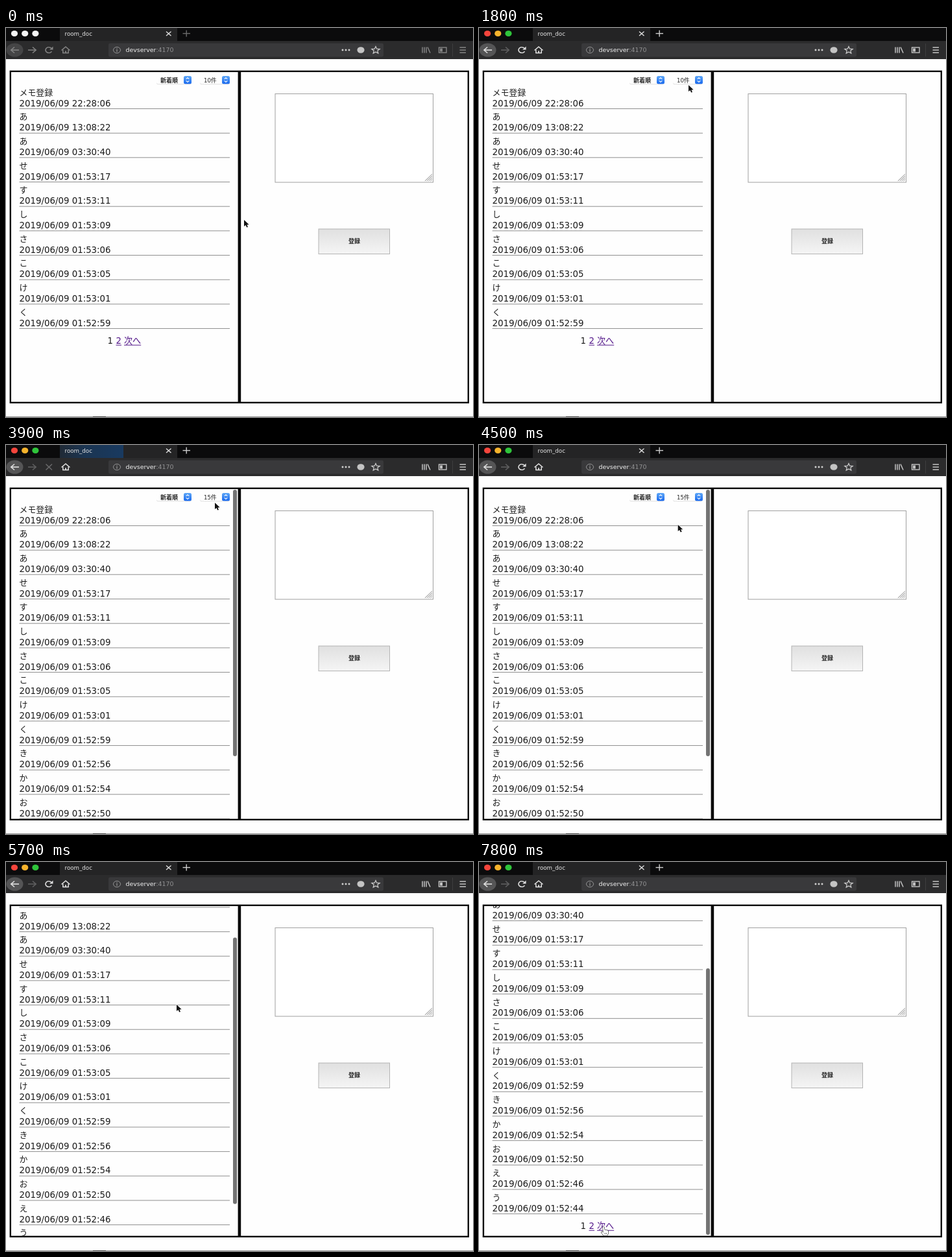
An HTML page with a canvas for the animation above (8 s loop, 720x600 px).

```html
<!DOCTYPE html>
<html lang="ja">
<head>
<meta charset="utf-8">
<title>Memo list</title>
<style>
html, body { margin: 0; width: 100%; height: 100%; overflow: hidden; background: #fefefe; }
canvas { display: block; width: 720px; height: 600px; }
</style>
</head>
<body>
<canvas id="stage" width="720" height="600"></canvas>
<script>
const ctx = document.getElementById('stage').getContext('2d');
const LOOP = 8000, STEP = 300;
const FONT = '"DejaVu Sans", "Noto Sans CJK JP", "Noto Sans CJK", sans-serif';
const ROW = 37.67, MAX_SCROLL = 109.2;

const memos = [
  ['メモ登録', '22:28:06'], ['あ', '13:08:22'], ['あ', '03:30:40'],
  ['せ', '01:53:17'], ['す', '01:53:11'], ['し', '01:53:09'],
  ['さ', '01:53:06'], ['こ', '01:53:05'], ['け', '01:53:01'],
  ['く', '01:52:59'], ['き', '01:52:56'], ['か', '01:52:54'],
  ['お', '01:52:50'], ['え', '01:52:46'], ['う', '01:52:44']
];

// Pointer path: time, x, y
const path = [
  [0, 367, 296], [300, 367, 296], [1500, 323, 88], [1800, 323, 88],
  [2100, 322, 82], [2700, 322, 82], [3000, 321.5, 88], [3600, 321.5, 88],
  [3900, 322, 89], [4200, 322, 89], [5100, 263, 220], [6300, 263, 220],
  [7500, 191, 563]
];

const ease = p => p * p * (3 - 2 * p);
const clamp = p => Math.max(0, Math.min(1, p));

function pointerAt(t) {
  let i = 0;
  while (i < path.length - 2 && t >= path[i + 1][0]) i++;
  const [t0, x0, y0] = path[i], [t1, x1, y1] = path[i + 1];
  const p = ease(clamp((t - t0) / (t1 - t0)));
  return [x0 + (x1 - x0) * p, y0 + (y1 - y0) * p];
}

function rect(x, y, w, h, color) {
  ctx.fillStyle = color;
  ctx.fillRect(x, y, w, h);
}

function frame(x, y, w, h, color, width = 1) {
  ctx.strokeStyle = color;
  ctx.lineWidth = width;
  ctx.strokeRect(x, y, w, h);
}

function round(x, y, w, h, r, fill) {
  ctx.beginPath();
  ctx.roundRect(x, y, w, h, r);
  ctx.fillStyle = fill;
  ctx.fill();
}

function oval(x, y, rx, ry, fill) {
  ctx.beginPath();
  ctx.ellipse(x, y, rx, ry, 0, 0, Math.PI * 2);
  if (fill) {
    ctx.fillStyle = fill;
    ctx.fill();
  } else ctx.stroke();
}

function trace(pts, close) {
  ctx.beginPath();
  for (let i = 0; i < pts.length; i += 2) ctx.lineTo(pts[i], pts[i + 1]);
  if (close) ctx.closePath();
}

function line(color, width, ...pts) {
  trace(pts);
  ctx.strokeStyle = color;
  ctx.lineWidth = width;
  ctx.stroke();
}

function text(s, x, y, size, color, weight = 400, align = 'left') {
  ctx.font = `${weight} ${size}px ${FONT}`;
  ctx.textAlign = align;
  ctx.fillStyle = color;
  ctx.fillText(s, x, y);
  return ctx.measureText(s).width;
}

function shade(y0, y1, from, to) {
  const g = ctx.createLinearGradient(0, y0, 0, y1);
  g.addColorStop(0, from);
  g.addColorStop(1, to);
  return g;
}

function drawTabs(active, loading) {
  rect(0, 0, 720, 20, '#0b0b0c');
  rect(83, 0, 181, 20, '#242425');
  if (loading) {
    const g = ctx.createLinearGradient(83, 0, 181, 0);
    g.addColorStop(0, '#202a36');
    g.addColorStop(0.4, '#1b3552');
    g.addColorStop(1, '#193a60');
    rect(83, 0, 98, 20, g);
  }
  const lights = active ? ['#f6453c', '#f5b32c', '#2fc43b'] : ['#f4f4f4', '#f4f4f4', '#f4f4f4'];
  lights.forEach((c, i) => oval(13 + i * 16.2, 8.5, 5.1, 4.5, c));
  text('room_doc', 90.5, 12, 8.7, '#e6e6e6');
  line('#dedede', 1.4, 247, 5.5, 254.5, 12);
  line('#dedede', 1.4, 254.5, 5.5, 247, 12);
  const plus = active ? '#d0d0d0' : '#6c6c6c';
  line(plus, 1.4, 272.5, 8.5, 284, 8.5);
  line(plus, 1.4, 278.2, 3.5, 278.2, 13.5);
}

function drawToolbar(active, loading) {
  const on = active ? '#e2e2e2' : '#858585';
  const mid = active ? '#c4c4c4' : '#858585';
  rect(0, 20, 720, 28, '#2b2b2c');
  oval(13.5, 34, 13, 10.5, active ? '#555556' : '#454546');
  line(on, 1.6, 20, 34, 8, 34);
  line(on, 1.6, 13, 29.5, 7.8, 34, 13, 38.5);
  const fwd = active ? '#626263' : '#858585';
  line(fwd, 1.5, 34, 34, 46, 34);
  line(fwd, 1.5, 41, 29.5, 46.2, 34, 41, 38.5);

  if (loading) {
    line('#6b6b6c', 1.5, 61.5, 29.5, 71, 38.5);
    line('#6b6b6c', 1.5, 71, 29.5, 61.5, 38.5);
  } else {
    ctx.strokeStyle = on;
    ctx.lineWidth = 1.6;
    ctx.beginPath();
    ctx.ellipse(66, 34, 5, 4.3, 0, 0.5, 5.5);
    ctx.stroke();
    trace([72.5, 28.5, 72.5, 33.5, 67, 33.5], true);
    ctx.fillStyle = on;
    ctx.fill();
  }
  line(on, 1.5, 85.5, 34.5, 92, 29, 98.5, 34.5);
  line(on, 1.5, 87.8, 33.5, 87.8, 38.6, 96.2, 38.6, 96.2, 33.5);
  line(on, 1.8, 92, 38, 92, 35.2);

  round(158, 23.5, 424, 21, 3, '#39393b');
  ctx.strokeStyle = '#929293';
  ctx.lineWidth = 1;
  oval(171, 34, 5.5, 4.7);
  line('#929293', 1.3, 171, 33.3, 171, 36.8);
  line('#929293', 1.3, 171, 31.2, 171, 32.4);
  const w = text('devserver', 184.5, 37.3, 9.4, '#f0f0f0');
  text(':4170', 184.5 + w, 37.3, 9.4, '#929293');

  for (let i = 0; i < 3; i++) oval(519 + i * 5, 34, 1.5, 1.4, '#d0d0d0');
  oval(547, 34, 5.6, 4.8, '#c4c4c4');
  const star = [];
  for (let i = 0; i < 10; i++) {
    const a = i * Math.PI / 5 - Math.PI / 2, r = i % 2 ? 0.45 : 1;
    star.push(570 + Math.cos(a) * r * 6.5, 34.3 + Math.sin(a) * r * 5.8);
  }
  trace(star, true);
  ctx.strokeStyle = '#d0d0d0';
  ctx.lineWidth = 1.2;
  ctx.stroke();

  for (let i = 0; i < 3; i++) line(mid, 1.5, 642 + i * 3, 29.5, 642 + i * 3, 38.5);
  line(mid, 1.5, 650, 29.5, 654, 38.5);
  frame(667.5, 30, 11.5, 8, mid, 1.4);
  rect(669, 31.5, 4, 5, mid);
  rect(688, 24, 1, 20, '#3d3d3e');
  for (let i = 0; i < 3; i++) line(mid, 1.5, 699.5, 30 + i * 4, 709, 30 + i * 4);
}

function drawSelect(x, label, labelX, boxX, y, weight) {
  round(x, y + 1, boxX + 12 - x, 12.6, 3, '#dedede');
  round(x, y, boxX + 12 - x, 12.6, 3, '#fefefe');
  text(label, labelX, y + 10, weight > 400 ? 9 : 8.6, '#222', weight);
  round(boxX, y + 0.3, 12, 12.3, 2.5, shade(y, y + 13, '#62aaf7', '#1767ee'));
  line('#fff', 1.1, boxX + 3.7, y + 5.2, boxX + 6, y + 3.2, boxX + 8.3, y + 5.2);
  line('#fff', 1.1, boxX + 3.7, y + 7.8, boxX + 6, y + 9.8, boxX + 8.3, y + 7.8);
}

function drawList(count, scroll, label) {
  ctx.save();
  ctx.beginPath();
  ctx.rect(8, 68, 349, 509);
  ctx.clip();
  ctx.translate(0, -scroll);
  drawSelect(232, '新着順', 238, 274, 73.6, 700);
  drawSelect(299, label, 305, 333, 73.6, 400);
  memos.slice(0, count).forEach(([title, time], i) => {
    const y = i * ROW;
    text(title, 20.5, y + 103.7, 12.9, '#1c1c1c');
    text('2019/06/09 ' + time, 20.5, y + 120.6, 13.35, '#1c1c1c');
    rect(20.5, y + 124, 324.5, 1, '#8f8f8f');
  });
  const y = (count - 1) * ROW + 148.3, link = '#551a8b';
  text('1', 156.5, y, 13.2, '#1c1c1c');
  text('2', 169.5, y, 13.2, link);
  text('次へ', 182, y, 13.1, link);
  rect(169.5, y + 1.3, 8.5, 1, link);
  rect(182, y + 1.3, 26.2, 1, link);
  ctx.restore();
  if (count > 10) round(350, 69 + scroll / MAX_SCROLL * 95, 6, 411, 3, '#747474');
}

function drawForm() {
  rect(415, 101, 244, 137, '#fff');
  frame(415, 101.5, 243.5, 136.5, '#a0a0a0');
  for (let i = 0; i < 4; i++) {
    const d = 2.5 + i * 2.7;
    line('#8d8d8d', 1, 657, 236 - d, 657 - d * 1.05, 236);
  }
  rect(482, 310, 110, 39, shade(310, 349, '#e0e0e0', '#f5f5f5'));
  frame(482, 310, 109.5, 38.5, '#b4b4b4');
  text('登録', 537, 332.2, 9, '#222', 700, 'center');
}

function drawMenu(active) {
  round(295, 72.5, 51, 14, 4, '#5c96e8');
  ctx.save();
  ctx.shadowColor = 'rgba(0,0,0,.4)';
  ctx.shadowBlur = 9;
  ctx.shadowOffsetY = 3;
  round(297, 73.5, 55, 37.5, 4, '#f5f5f5');
  ctx.restore();
  rect(297, 76.5 + active * 10.4, 55, 10.4, '#2b78f0');
  ['10件', '15件', '30件'].forEach((s, i) => {
    text(s, 314.5, 84.6 + i * 10.5, 8.6, i === active ? '#fff' : '#222');
  });
  line(active ? '#222' : '#fff', 1.2, 303.5, 81.5, 305.5, 84, 309.5, 78.5);
}

function outlined(pts, fill, stroke) {
  trace(pts, true);
  ctx.lineJoin = 'round';
  ctx.strokeStyle = stroke;
  ctx.lineWidth = 1.2;
  ctx.stroke();
  ctx.fillStyle = fill;
  ctx.fill();
  ctx.lineJoin = 'miter';
}

function drawPointer(x, y, hand) {
  ctx.save();
  ctx.translate(x, y);
  if (hand) {
    outlined([0, 0, 2, 0, 2.8, 4.5, 6.5, 5, 8.5, 6.5, 8.2, 10, 6.5, 13, 1, 13,
      -2.5, 8.5, -1.5, 7.2, 0.6, 8.4], '#fff', '#222');
    line('#333', 0.7, 3.2, 9, 3.2, 11.3);
    line('#333', 0.7, 5.4, 9, 5.4, 11.3);
  } else {
    outlined([0, 0, 0, 10, 2.5, 8, 4.1, 11.6, 6, 10.9, 4.4, 7.4, 7.6, 7.3], '#111', '#fff');
  }
  ctx.restore();
}

function draw(t) {
  const active = t >= 300;
  const loading = t >= 3600 && t < 4200;
  const scroll = MAX_SCROLL * ease(clamp((t - 5400) / 600));
  rect(0, 0, 720, 600, '#fefefe');
  drawTabs(active, loading);
  drawToolbar(active, loading);
  drawList(t >= 3900 ? 15 : 10, scroll, t >= 3600 ? '15件' : '10件');
  drawForm();
  frame(6.8, 66.8, 706, 511, '#0a0a0a', 2.4);
  rect(357.6, 66, 4.6, 513, '#050505');
  rect(0, 599, 720, 1, '#999');
  rect(134, 599, 20, 1, '#444');
  if (t >= 2400 && t < 3600) drawMenu(t < 3000 ? 0 : 1);
  drawPointer(...pointerAt(t), t >= 7500);
}

function tick() {
  const t = performance.now() % LOOP;
  draw(Math.floor(t / STEP) * STEP);
  requestAnimationFrame(tick);
}
tick();
</script>
</body>
</html>
```
